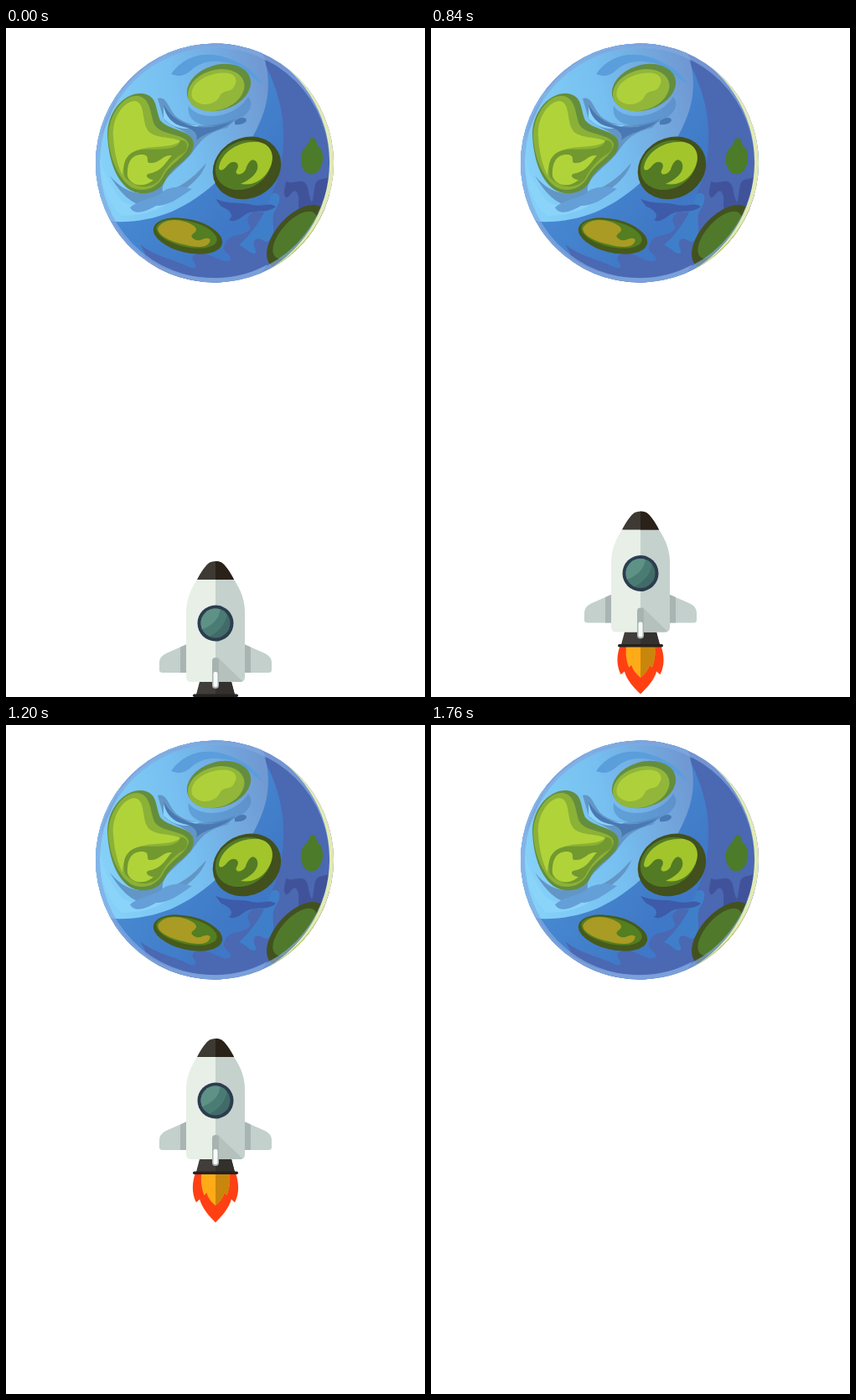
Recreate the animation shown at these times as an HTML page. Size 500 px wide and 798 px high, loop 3840 ms.

```html
<!DOCTYPE html>
<html lang="en">
<head>
<meta charset="utf-8">
<title>Rocket to planet</title>
<style>
  html, body { margin: 0; width: 100%; height: 100%; overflow: hidden; background: #fff; }
  svg { display: block; width: 100%; height: 100%; }
</style>
</head>
<body>
<svg viewBox="0 0 500 798">
  <defs>
    <clipPath id="disc"><ellipse cx="249" cy="161" rx="142" ry="142.5"/></clipPath>
    <clipPath id="sky"><rect y="298" width="500" height="500"/></clipPath>
    <clipPath id="rightHalf"><rect x="250" width="100" height="300"/></clipPath>
    <clipPath id="glass"><circle cx="250" cy="74" r="17.5"/></clipPath>
    <linearGradient id="sea" x1="0" y1="0" x2="1" y2="1">
      <stop offset=".3" stop-color="#4a90d6"/><stop offset=".75" stop-color="#3f78c6"/>
    </linearGradient>
    <linearGradient id="shine" gradientUnits="userSpaceOnUse" x1="110" y1="130" x2="312" y2="80">
      <stop offset="0" stop-color="#84d0f8"/><stop offset=".5" stop-color="#76bff0"/><stop offset="1" stop-color="#7099d3"/>
    </linearGradient>
    <path id="body" d="M228 22H272C281 36 285 47 285 62V138Q285 144 279 144H221Q215 144 215 138V62C215 47 219 36 228 22Z"/>
    <path id="nose" d="M228 22C233 12 239 4 243 1.5Q250-1.5 257 1.5C261 4 267 12 272 22Z"/>
    <path id="nozzle" d="M231 144H269L273 159H227Z"/>
    <g id="fin">
      <path fill="#c3d0cc" d="M216 99L191 110Q183 114 183 121V130Q183 133 187 133H216Z"/>
      <path fill="#a9b4b3" d="M208 102.500L216 99V133H208Z"/>
    </g>
    <path id="core" d="M234 0H266C267 10 266 18 263 27L260 24C259 30 255 35 250 40C245 35 241 30 240 24L237 27C234 18 233 10 234 0Z"/>
  </defs>

  <g clip-path="url(#disc)">
    <!-- deep water -->
    <path fill="#4b68b3" d="M100 10H400V310H100Z"/>
    <path fill="url(#sea)" d="M100 10H290C314 46 332 88 331 128C331 158 327 177 317 198C315 207 319 216 311 219C301 223 299 213 290 224C284 232 296 236 289 242C279 250 267 244 261 258C256 268 271 270 268 277C258 284 240 263 226 270C216 276 231 282 225 286C210 291 190 278 168 265L150 310H100Z"/>
    <path fill="#4b68b3" d="M160 258C180 274 202 276 220 286C238 293 254 285 274 290L250 310H190Z"/>
    <path fill="#3f7fca" d="M317 198C310 221 296 243 278 259C287 262 291 270 297 269C302 266 291 258 298 252C306 248 308 260 316 252C324 238 313 228 323 214C329 203 327 194 317 198Z"/>
    <path fill="#40539a" d="M334 183C344 187 348 180 356 184C362 188 360 199 365 208C369 198 366 184 374 181L386 178V225H352C346 212 352 204 347 196C342 190 338 204 334 202C329 196 334 190 334 183Z"/>
    <path fill="#3d5ba8" d="M250 204C268 211 281 207 294 211C306 214 313 207 322 213C313 221 301 217 291 220C283 222 275 234 266 229C273 223 267 217 257 213Z"/>

    <!-- lit water -->
    <path fill="url(#shine)" d="M100 10H296C316 41 318 79 303 112C284 158 241 200 198 219C176 228 153 232 128 231L100 220Z"/>
    <path fill="#5a9edc" d="M197 55C211 35 232 29 254 33C277 38 299 52 306 67C291 58 282 45 263 41C240 37 229 43 219 52C209 60 202 56 197 55Z"/>
    <path fill="#6296c6" d="M181 84C193 80 194 100 206 108C224 120 248 118 274 108L264 119C242 124 233 132 222 149C209 166 184 179 187 195C204 193 222 181 239 161C234 178 216 193 190 207C160 223 139 202 124 176C143 200 166 201 181 191C190 171 219 158 224 139C222 122 195 119 188 108Z"/>
    <path fill="#8ad3f9" d="M111 142C113 169 125 190 139 207C160 218 181 212 210 193C191 216 167 224 138 224C121 209 111 184 111 142ZM188 94C195 111 211 116 231 116C214 124 199 119 188 108Z"/>
    <path fill="#4a78b2" d="M188 91C197 108 217 121 246 118L270 112C254 124 239 123 227 134C230 126 223 120 212 118C199 115 190 106 188 91ZM273 111C281 104 290 107 286 112Q281 116 273 115Z"/>
    <path fill="#649fd8" d="M148 214C163 202 178 205 190 193C206 187 216 190 222 192C204 205 193 212 179 212C169 218 154 225 148 214Z"/>
    <path fill="#477fbd" d="M218 93C230 111 271 110 289 82C302 98 275 116 250 117C230 118 215 109 218 93Z" opacity=".45"/>

    <!-- land -->
    <path fill="#648e3c" d="M121 127C121 102 139 77 162 78C181 80 178 96 184 110C194 123 224 121 224 139C223 157 199 163 190 182C182 199 159 201 146 192C130 180 122 154 121 127Z"/>
    <path fill="#8bb136" d="M122 128C123 104 139 80 157 81C173 83 172 103 177 115C185 129 215 125 218 139C216 154 196 160 187 178C179 193 160 197 148 189C132 177 123 152 122 128Z"/>
    <path fill="#b0d33a" d="M128 130C126 108 140 88 153 87C166 88 162 108 168 120C174 133 200 129 208 135C198 145 163 138 149 150C141 159 139 169 139 176C133 164 129 148 128 130Z"/>
    <path fill="#71992f" d="M142 178C137 158 146 146 164 145C183 144 205 147 208 134C218 133 219 145 211 150C198 157 190 168 184 180C174 193 154 192 142 178Z"/>
    <path fill="#b0d33a" d="M145 177C144 160 150 150 164 151C174 153 164 162 174 161C185 160 187 151 198 152C189 162 187 169 174 173C163 174 169 181 176 181C167 190 150 190 145 177Z"/>

    <g transform="rotate(-17 254 71)">
      <ellipse cx="254" cy="71" rx="39" ry="27" fill="#648e3e"/>
      <ellipse cx="250" cy="73" rx="34.500" ry="24" fill="#92b63a"/>
      <path fill="#aed13b" d="M220 72C222 56 244 51 261 55C277 58 280 68 272 75C265 82 260 74 252 81C243 91 222 86 220 72Z"/>
    </g>

    <g transform="rotate(-28 287 166)">
      <ellipse cx="287" cy="167" rx="42" ry="36" fill="#41501c"/>
      <ellipse cx="285" cy="162" rx="35" ry="28" fill="#537b24"/>
    </g>
    <path fill="#a2c52c" d="M254 166C258 146 280 134 302 136C320 140 322 158 312 172C304 184 292 188 280 186C294 180 304 170 299 160C294 153 288 161 286 169C281 177 271 176 276 168C280 160 270 156 264 164C260 170 254 172 254 166Z"/>

    <path fill="#4c7b2a" d="M363 132C372 128 369 139 374 142C382 150 378 172 367 174C358 177 350 165 352 153C353 143 361 142 363 132Z"/>

    <g transform="rotate(13 217 248)">
      <ellipse cx="217" cy="248" rx="42" ry="20" fill="#465a1b"/>
      <ellipse cx="215" cy="246" rx="37" ry="15.500" fill="#537e22"/>
      <path fill="#a99b23" d="M180 247C185 232 207 229 222 235C232 241 214 246 225 250C235 253 235 243 244 246C246 257 229 260 214 259C197 259 182 256 180 247Z"/>
    </g>

    <g transform="rotate(-48 347 249)">
      <ellipse cx="347" cy="249" rx="46" ry="25" fill="#42521f"/>
      <ellipse cx="347" cy="246" rx="35" ry="16.500" fill="#50792c"/>
    </g>

    <!-- rim light -->
    <ellipse cx="249" cy="161" rx="139.500" ry="140" fill="none" stroke="#84a9e0" stroke-opacity=".7" stroke-width="5"/>
    <path fill="#7ca5dd" opacity=".75" d="M129 232C151 274 198 299 249 298C273 298 294 292 312 282L300 299L249 304C190 307 138 274 120 228ZM113 130C125 75 170 31 222 24C257 18 289 25 312 40L300 24L249 17L150 45Z"/>
    <path fill="#e3eab4" d="M298 24A142 142.500 0 0 1 298 296A149 149 0 0 0 298 24Z"/>
    <path fill="#b5c437" d="M386 202A142 142.500 0 0 1 298 296A158 158 0 0 0 386 202Z"/>
  </g>

  <g clip-path="url(#sky)">
    <g id="rocket">
      <g id="flame">
        <path fill="#ff4013" d="M227 0H273C277 12 277 25 272 36L268 32C265 44 257 53 250 61C243 53 235 44 232 32L228 36C223 25 223 12 227 0Z"/>
        <use href="#core" fill="#ffab18"/>
        <use href="#core" fill="#c9860c" clip-path="url(#rightHalf)"/>
      </g>
      <use href="#fin"/>
      <use href="#fin" transform="translate(500) scale(-1 1)"/>
      <use href="#nozzle" fill="#403d3a"/>
      <use href="#nozzle" fill="#33302d" clip-path="url(#rightHalf)"/>
      <rect x="223" y="158.500" width="54" height="3.500" rx="1.700" fill="#25221f"/>
      <use href="#body" fill="#e7efe7"/>
      <use href="#body" fill="#c4d1cd" clip-path="url(#rightHalf)"/>
      <path fill="#b4c1bd" d="M252 114L282 143Q281 144 279 144H252Z"/>
      <use href="#nose" fill="#3d3933"/>
      <use href="#nose" fill="#2a2118" clip-path="url(#rightHalf)"/>
      <circle cx="250" cy="74" r="21.500" fill="#2c3d4e"/>
      <g clip-path="url(#glass)">
        <path fill="#416b68" d="M230 54H270V94H230Z"/>
        <path fill="#4a7c74" d="M264 54C266 72 254 86 238 92L230 80V54Z"/>
        <path fill="#5f9287" d="M256 54C256 66 248 77 232 82L230 54Z"/>
      </g>
      <rect x="246" y="115" width="8" height="37" rx="4" fill="#a7b3b1"/>
      <rect x="247.500" y="132" width="5" height="18" rx="2" fill="#f7faf7"/>
    </g>
  </g>
</svg>
<script>
  const LOOP = 3840, STEP = 40, GONE = 1760, REST_Y = 636;
  const rocket = document.getElementById('rocket');
  const flame = document.getElementById('flame');

  // [time in ms, height climbed in px]
  const climb = [[560, 0], [840, 59.5], [1000, 134.5], [1120, 207],
                 [1200, 262], [1440, 431], [1680, 539], [1760, 565]];

  const slope = i => (climb[i + 1][1] - climb[i][1]) / (climb[i + 1][0] - climb[i][0]);

  function tangent(i) {
    if (i === 0) return 0;
    if (i === climb.length - 1) return slope(i - 1);
    const before = climb[i][0] - climb[i - 1][0];
    const after = climb[i + 1][0] - climb[i][0];
    return (slope(i - 1) * after + slope(i) * before) / (before + after);
  }

  // Cubic Hermite curve through the climb points
  function climbAt(t) {
    if (t <= climb[0][0]) return 0;
    const i = climb.findIndex(([time]) => time >= t) - 1;
    const [t0, y0] = climb[i], [t1, y1] = climb[i + 1];
    const span = t1 - t0, u = (t - t0) / span, v = 1 - u;
    return y0 * (1 + 2 * u) * v * v + y1 * u * u * (3 - 2 * u)
         + span * u * v * (tangent(i) * v - tangent(i + 1) * u);
  }

  const wave = (t, period) => Math.cos((t - 840) / period * 2 * Math.PI);

  function draw(now) {
    const t = Math.floor((now % LOOP) / STEP) * STEP;
    const visible = t < GONE;
    rocket.setAttribute('visibility', visible ? 'visible' : 'hidden');
    if (visible) {
      rocket.setAttribute('transform', `translate(0 ${(REST_Y - climbAt(t)).toFixed(2)})`);
      const sx = 1.02 + 0.045 * wave(t, 420);
      const sy = (62 - 5 * wave(t, 320)) / 61;
      flame.setAttribute('transform', `translate(${250 * (1 - sx)} 161) scale(${sx} ${sy})`);
    }
  }

  const start = performance.now();
  function tick() {
    draw(performance.now() - start);
    requestAnimationFrame(tick);
  }
  tick();
</script>
</body>
</html>
```
